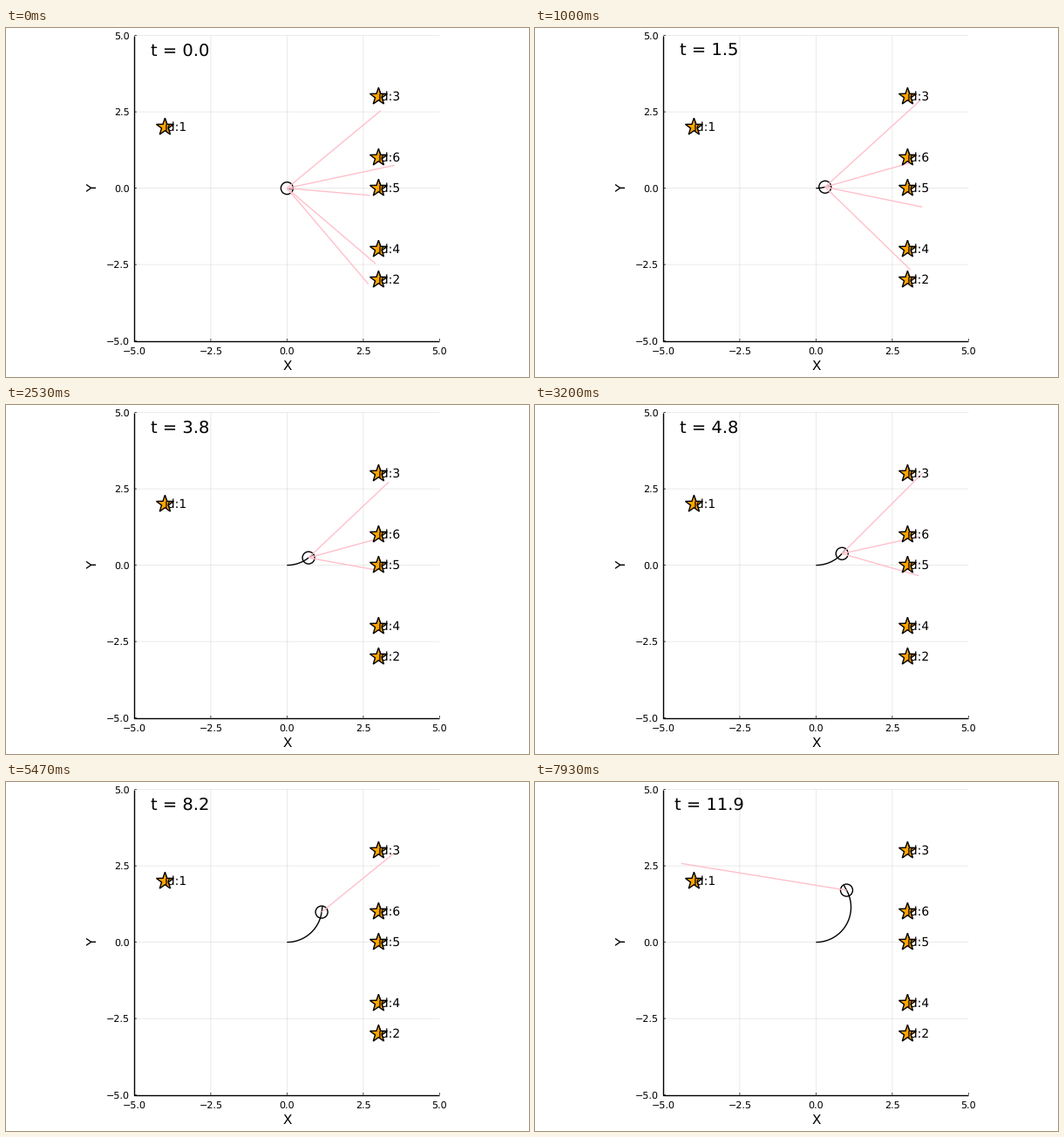
Animation, 600 px wide and 400 px high, one loop 8 s. Source, as a matplotlib script:

```python
import math
import random

import matplotlib.pyplot as plt
from matplotlib.animation import FuncAnimation
from matplotlib.patches import Circle, Polygon

W, H, DPI = 600, 400, 100
CX, CY, UNIT = 322.4, 183.6, 35         # pixel place of (0, 0), pixels per unit
LOOP, TICK, STEPS = 8000, 20, 120
SPEED, TURN = 0.2, math.radians(10)
RADIUS = 0.2
FIELD = (math.radians(-60), math.radians(58.8))
LANDMARKS = {1: (-4, 2), 2: (3, -3), 3: (3, 3), 4: (3, -2), 5: (3, 0), 6: (3, 1)}

plt.rcParams["font.family"] = "DejaVu Sans"
plt.rcParams["text.hinting"] = "none"
fig = plt.figure(figsize=(W / DPI, H / DPI), dpi=DPI, facecolor="white")
ax = fig.add_axes([0, 0, 1, 1])
ax.set_xlim(0, W)
ax.set_ylim(H, 0)
ax.axis("off")


def px(x, y):
    return CX + UNIT * x, CY - UNIT * y


def line(points, color="black", width=1.0, z=2, **kw):
    xs, ys = zip(*points)
    return ax.plot(xs, ys, color=color, lw=width, zorder=z,
                   solid_capstyle="butt", **kw)[0]


def label(x, y, text, size, ha="center"):
    return ax.text(x, y, text, fontsize=size, ha=ha, va="baseline", zorder=8)


def draw_axes():
    grid = dict(alpha=0.1, width=0.6, z=1, snap=False)
    for v in (-2.5, 0, 2.5):
        line([px(v, -5), px(v, 5)], **grid)
    for v in (-2.5, 0, 2.5, 5):
        line([px(-5, v), px(5, v)], **grid)
    line([px(-5, 5), px(-5, -5), px(5, -5)])
    for v in (-5, -2.5, 0, 2.5, 5):
        text = f"{v:.1f}".replace("-", "\u2212")
        x, bottom = px(v, -5)
        left, y = px(-5, v)
        line([(x, bottom), (x, bottom - 2.5)], width=0.5, snap=False)
        line([(left, y), (left + 2.5, y)], width=0.5, snap=False)
        label(x, 374, text, 8)
        label(142, y + 4.2, text, 8, "right")
    label(CX, 392.5, "X", 11)
    ax.text(100.3, CY - 0.5, "Y", fontsize=11, rotation=90, ha="center", va="center")


def draw_landmark(key, pos):
    x, y = px(*pos)
    corners = []
    for i in range(10):
        r = 10.4 if i % 2 == 0 else 4.1
        a = math.pi * i / 5
        corners.append((x + r * math.sin(a), y - r * math.cos(a)))
    ax.add_patch(Polygon(corners, fc="orange", ec="black", lw=1,
                         joinstyle="miter", zorder=6))
    label(x - 1, y + 4.4, f"id:{key}", 10, "left")


def pose(t):
    a = TURN * t
    r = SPEED / TURN
    return r * math.sin(a), r * (1 - math.cos(a)), a


def sightings(step):
    """End points of the noisy, biased sightings of all landmarks in view."""
    rng = random.Random(step)
    x, y, heading = pose(step / 10)
    ends = []
    for mx, my in LANDMARKS.values():
        ratio = min(max(rng.gauss(1.04, 0.1), 0.86), 1.2)
        error = math.radians(rng.gauss(-5.3, 1.7))
        bearing = math.atan2(my - y, mx - x)
        turn = (bearing - heading + math.pi) % (2 * math.pi) - math.pi
        if FIELD[0] < turn < FIELD[1]:
            d = ratio * math.hypot(mx - x, my - y)
            a = bearing + error
            ends.append((x + d * math.cos(a), y + d * math.sin(a)))
    return ends


draw_axes()
for key, pos in LANDMARKS.items():
    draw_landmark(key, pos)

clock = label(px(-3.5, 0)[0], 32, "", 14)
trail = line([px(0, 0)], z=4)
nose = line([px(0, 0)], z=4)
body = ax.add_patch(Circle(px(0, 0), RADIUS * UNIT, fill=False, ec="black", lw=1, zorder=4))
beams = [line([px(0, 0)], "pink", z=5) for _ in LANDMARKS]


def set_points(artist, points):
    artist.set_data(*zip(*[px(*p) for p in points]))


def update(frame):
    step = int((frame * TICK + 15) * STEPS / LOOP)
    x, y, a = pose(step / 10)
    clock.set_text(f"t = {step / 10:.1f}")
    set_points(trail, [pose(i / 10)[:2] for i in range(step + 1)])
    set_points(nose, [(x, y), (x + RADIUS * math.cos(a), y + RADIUS * math.sin(a))])
    body.center = px(x, y)
    ends = sightings(step)
    for i, beam in enumerate(beams):
        beam.set_visible(i < len(ends))
        if i < len(ends):
            set_points(beam, [(x, y), ends[i]])
    return [clock, trail, nose, body, *beams]


anim = FuncAnimation(fig, update, frames=LOOP // TICK, interval=TICK,
                     repeat=True, repeat_delay=0)
plt.show()
```
